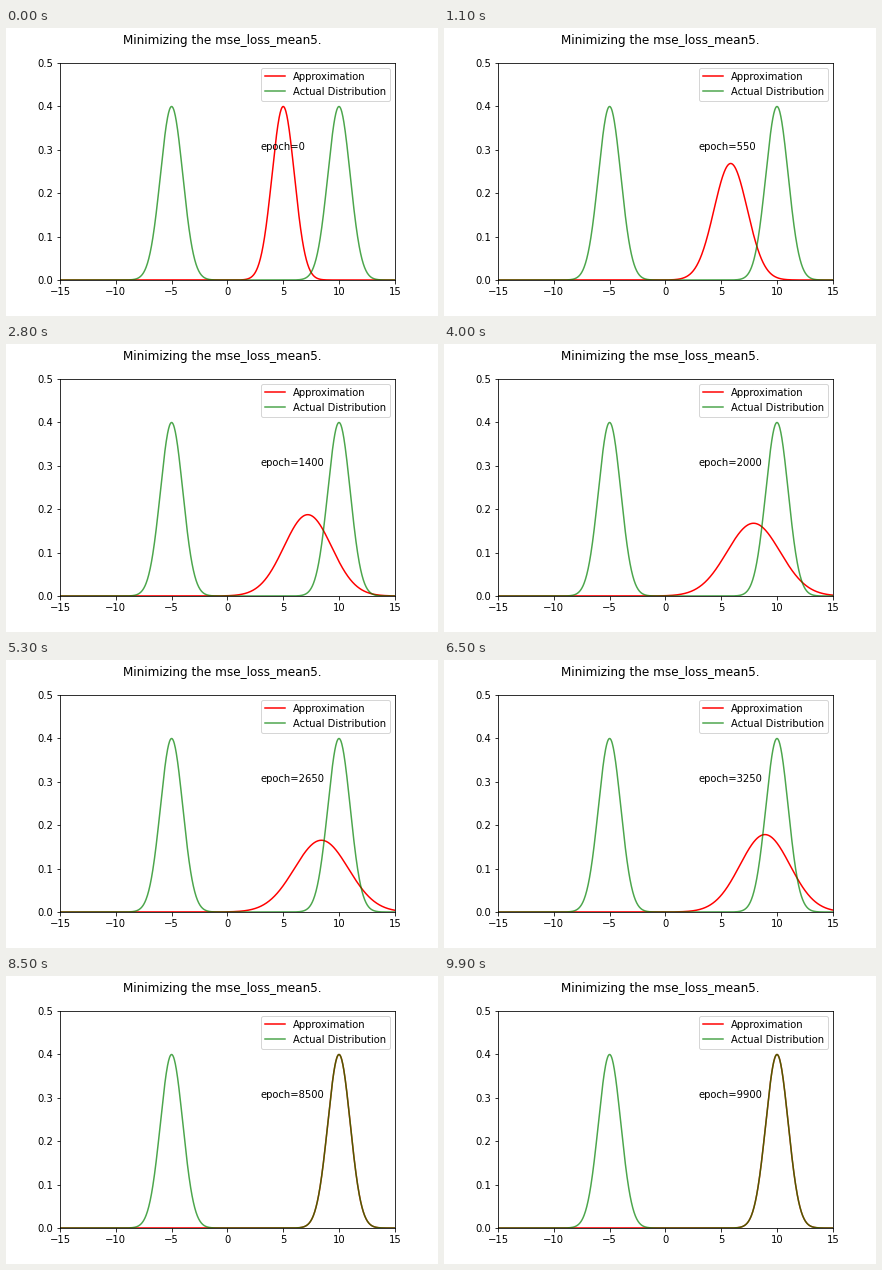
A matplotlib script that plays this animation: 432x288 px, repeating every 10 s.

```python
import numpy as np
import matplotlib.pyplot as plt
from matplotlib.animation import FuncAnimation

FRAMES = 100
INTERVAL = 100
JUMP = 70  # from here on the fit has converged

plt.rcParams.update({"font.family": "DejaVu Sans", "font.size": 10})

# Drift of the fitted mean and spread while training
KEYS = [0, 11, 28, 53, 65]
mean_path = np.poly1d(np.polyfit(KEYS, [5, 5.85, 7.2, 8.42, 8.92], 4))
std_path = np.poly1d(np.polyfit(KEYS, [1, 1.489, 2.133, 2.418, 2.241], 4))


def normal(x, mean, std):
    return np.exp(-0.5 * ((x - mean) / std) ** 2) / (std * np.sqrt(2 * np.pi))


def state(i):
    """Epoch, mean and spread of the approximation at step i."""
    if i < JUMP:
        return 50 * i, mean_path(i), std_path(i)
    return 100 * i, 10, 1


x = np.linspace(-15, 15, 1000)

fig, ax = plt.subplots(figsize=(6, 4), dpi=72, facecolor="white")
fig.subplots_adjust(left=0.125, right=0.9, bottom=0.125, top=0.88)
fig.suptitle("Minimizing the mse_loss_mean5.", fontsize=12)

approx, = ax.plot(x, normal(x, 5, 1), color="red", label="Approximation")
ax.plot(x, normal(x, -5, 1) + normal(x, 10, 1), color="green", alpha=0.7,
        label="Actual Distribution")
label = ax.text(3, 0.3, "epoch=0")
ax.set(xlim=(-15, 15), ylim=(0, 0.5))
ax.legend(loc="upper right")


def update(i):
    epoch, mean, std = state(i)
    approx.set_ydata(normal(x, mean, std))
    label.set_text(f"epoch={epoch}")
    return approx, label


anim = FuncAnimation(fig, update, frames=FRAMES, interval=INTERVAL,
                     repeat=True, repeat_delay=0, blit=False)
plt.show()
```
